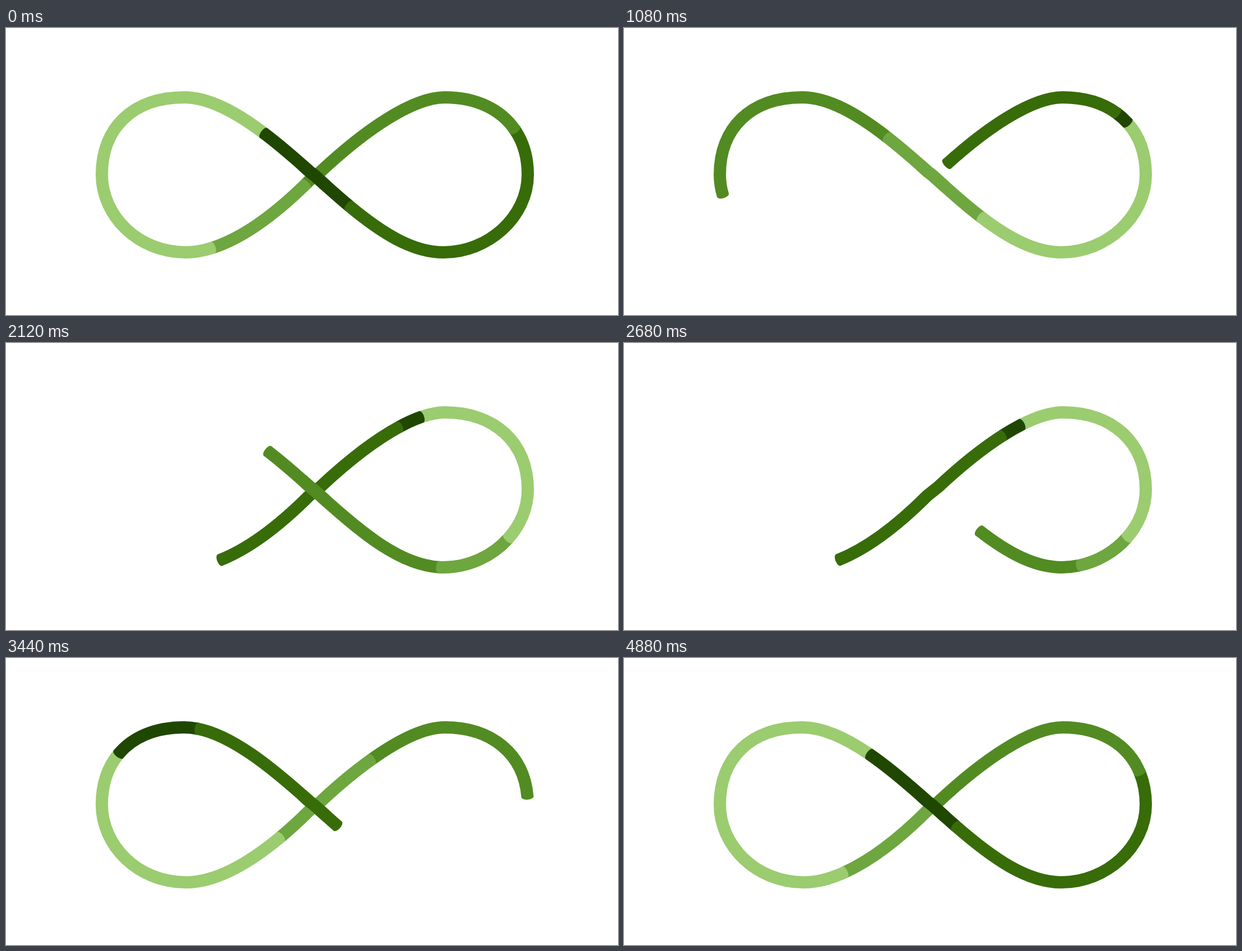
An HTML page with a canvas that plays this animation: 1092x513 px, repeating every 5000 ms.

```html
<!DOCTYPE html>
<html lang="en">
<head>
<meta charset="utf-8">
<title>Infinity loop</title>
<style>
  html, body { margin: 0; width: 100%; height: 100%; overflow: hidden; background: #fff; }
  canvas { display: block; width: 1092px; height: 513px; }
</style>
</head>
<body>
<canvas id="stage" width="1092" height="513"></canvas>
<script>
const ctx = document.getElementById('stage').getContext('2d');
const WIDTH = 22, CAP = 5, CROSS = 30, LOOP = 5000, STEP = 40;

// One lap of the figure eight, starting at the crossing towards lower right.
const lap = `L560 272 C640 345 710 401 781 401 C860 401 931 338 931 262
  C931 178 872 124 783 124 C725 124 640 183 561 257 L541 273
  C472 342 390 401 321 401 C235 401 171 335 171 262
  C171 180 225 124 318 124 C384 124 460 183 541 256 L551 264`;
const track = document.createElementNS('http://www.w3.org/2000/svg', 'path');
track.setAttribute('d', 'M551 264' + lap);
const L = track.getTotalLength();
const twoLaps = new Path2D('M551 264' + lap + lap);

const colors = ['#528b22', '#6ea63f', '#9bcc70', '#204700', '#376c09'];

// Time, then the five band starts and the tail of the last band (lap = 2007).
const keys = [
  [0,    -1424, -983, -780, -119, 81,   583],
  [480,  -1133, -715, -379, 37,   281,  701],
  [1080, -542,  -107, 113,  599,  625,  970],
  [1160, -475,  -48,  163,  648,  667,  1004],
  [1600, -308,  69,   272,  728,  769,  1149],
  [2240, -64,   285,  411,  778,  820,  1217],
  [2680, 109,   304,  404,  804,  843,  1213],
  [2800, 160,   312,  406,  815,  855,  1217],
  [3440, 513,   871,  1085, 1599, 1754, 2062],
  [3920, 540,   955,  1150, 1735, 1930, 2346],
  [4480, 556,   993,  1198, 1845, 2050, 2526],
  [4600, 557,   997,  1200, 1861, 2061, 2564]
];
const last = keys.length - 1;
const mod = s => ((s % L) + L) % L;

const rate = (i, c) => (keys[i + 1][c] - keys[i][c]) / (keys[i + 1][0] - keys[i][0]);

// Monotone cubic slope at key i.
function slope(i, c) {
  if (i === 0) return rate(0, c);
  if (i === last) return rate(last - 1, c);
  const a = rate(i - 1, c), b = rate(i, c);
  return a * b <= 0 ? 0 : 2 * a * b / (a + b);
}

function valueAt(t, c) {
  if (t >= keys[last][0]) return keys[last][c] * L / 2007;
  let i = 0;
  while (keys[i + 1][0] <= t) i++;
  const h = keys[i + 1][0] - keys[i][0], u = (t - keys[i][0]) / h, v = 1 - u;
  const y = v * v * (1 + 2 * u) * keys[i][c] + u * u * (3 - 2 * u) * keys[i + 1][c]
    + h * u * v * (v * slope(i, c) - u * slope(i + 1, c));
  return y * L / 2007;
}

function band(from, to, color) {
  ctx.strokeStyle = color;
  ctx.setLineDash([to - from, 3 * L]);
  ctx.lineDashOffset = -mod(from);
  ctx.stroke(twoLaps);
}

function cap(s, color) {
  const p = track.getPointAtLength(mod(s));
  const a = track.getPointAtLength(mod(s - 1)), b = track.getPointAtLength(mod(s + 1));
  ctx.fillStyle = color;
  ctx.beginPath();
  ctx.ellipse(p.x, p.y, CAP, WIDTH / 2, Math.atan2(b.y - a.y, b.x - a.x), 0, 2 * Math.PI);
  ctx.fill();
}

// Paints everything lying on the track between lo and hi.
function paint(edges, lo, hi) {
  const near = s => s > lo - CAP && s < hi + CAP;
  const tail = edges[5];
  if (near(tail)) cap(tail, colors[4]);
  for (const i of [4, 0, 1, 2, 3]) {
    const from = Math.max(edges[i], lo), to = Math.min(edges[i + 1], hi);
    if (to > from) band(from, to, colors[i]);
    if (near(edges[i])) cap(edges[i], colors[i]);
  }
  if (near(edges[4])) cap(edges[4], colors[4]);
}

function draw(now) {
  const t = Math.floor((now % LOOP) / STEP) * STEP;
  const edges = [1, 2, 3, 4, 5, 6].map(c => valueAt(t, c));
  ctx.fillStyle = '#fff';
  ctx.fillRect(0, 0, 1092, 513);
  ctx.lineWidth = WIDTH;
  paint(edges, -Infinity, Infinity);
  // The falling diagonal always passes over the rising one.
  for (let k = -1; k <= 2; k++) paint(edges, k * L - CROSS, k * L + CROSS);
}

const start = performance.now();
function frame() {
  draw(performance.now() - start);
  requestAnimationFrame(frame);
}
frame();
</script>
</body>
</html>
```
